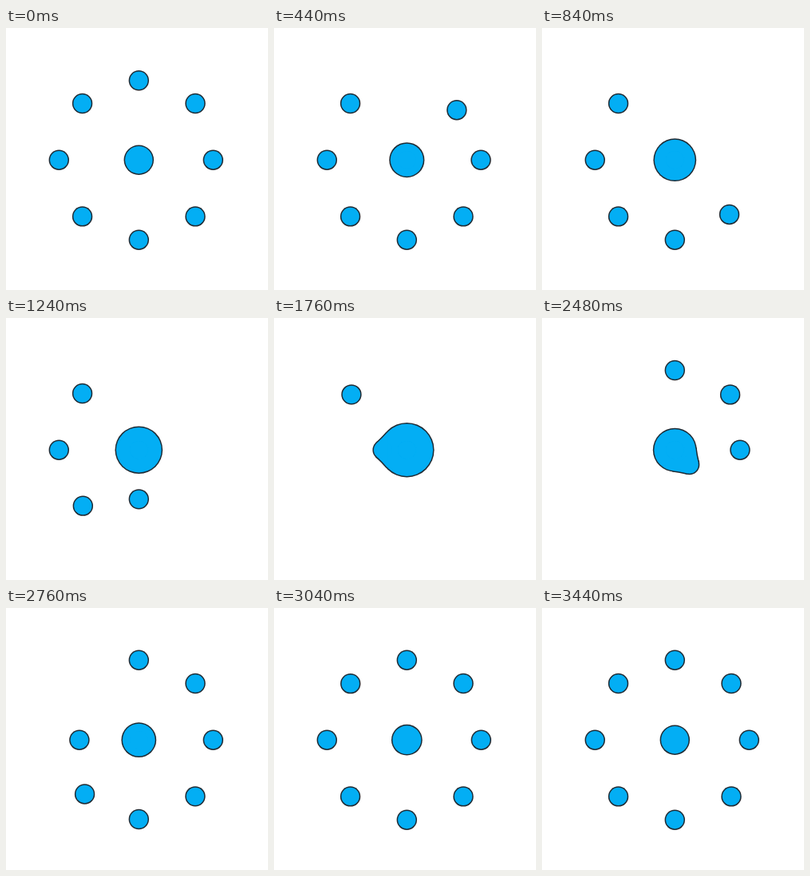
Write an HTML page with a canvas that moves like this. It is 328 px wide and 328 px high and loops after 3480 ms.

```html
<!DOCTYPE html>
<html lang="en">
<head>
<meta charset="utf-8">
<title>Gooey ring</title>
<style>
  html, body { margin: 0; width: 100%; height: 100%; overflow: hidden; background: #fff; }
  canvas { display: block; width: 328px; height: 328px; }
</style>
</head>
<body>
<canvas id="stage"></canvas>
<script>
const LOOP = 3480, COUNT = 8, TURN = 2120;
const CX = 166.3, CY = 165.2;
const BALL = 12.7, CORE = 18.7, FULL = 36.5;
const LINE = 1.5, FILL = '#03aef4', INK = '#1f2a33';

const canvas = document.getElementById('stage');
const ctx = canvas.getContext('2d');
const dpr = window.devicePixelRatio || 1;
canvas.width = canvas.height = 328 * dpr;

const clamp = x => Math.min(1, Math.max(0, x));
const expoIn = x => x <= 0 ? 0 : x >= 1 ? 1 : 2 ** (10 * (x - 1));
const expoOut = x => 1 - expoIn(1 - x);
const cubicOut = x => 1 - (1 - x) ** 3;

// Balls are swallowed one by one, clockwise from the top, then shot out again.
const swallowed = (i, t) => expoIn((t + 118 - 240 * i) / 463);
const released = (i, t) => expoOut((t - 2234 - 78 * i) / 300);

function ballDistance(i, t) {
  const rest = i === 2 ? 93 : 100;
  return rest * (t < TURN ? 1 - swallowed(i, t) : released(i, t));
}

// While filling up, the core's area grows with what it has swallowed.
function coreRadius(t) {
  if (t >= TURN) {
    return FULL + (CORE - FULL) * cubicOut(clamp((t - 2220) / 1240));
  }
  let eaten = 0;
  for (let i = 0; i < COUNT; i++) eaten += swallowed(i, t) / COUNT;
  return Math.sqrt(CORE ** 2 + (FULL ** 2 - CORE ** 2) * eaten);
}

function disc(x, r) {
  ctx.beginPath();
  ctx.arc(x, 0, r, 0, 2 * Math.PI);
  ctx.fill();
}

// Concave bridge between the core and a ball on the x axis; it straightens as they overlap.
function neck(R, d, inset) {
  if (d <= R - BALL + 0.1) return;
  const bend = 8 + 0.8 * Math.max(0, R + BALL - d) ** 2;
  const a = R + bend, b = BALL + bend;
  const x = (d * d + a * a - b * b) / (2 * d);
  const h = Math.sqrt(Math.max(0, a * a - x * x));
  const rho = bend + inset;
  if (x < d && h <= rho) return;
  ctx.beginPath();
  ctx.arc(x, h, rho, Math.atan2(-h, -x), Math.atan2(-h, d - x));
  ctx.arc(x, -h, rho, Math.atan2(h, d - x), Math.atan2(h, -x));
  ctx.closePath();
  ctx.fill();
}

function paint(t, color, inset) {
  const R = coreRadius(t);
  ctx.fillStyle = color;
  disc(0, R - inset);
  for (let i = 0; i < COUNT; i++) {
    const d = ballDistance(i, t);
    ctx.save();
    ctx.rotate((i - 2) * Math.PI / 4);
    disc(d, BALL - inset);
    neck(R, d, inset);
    ctx.restore();
  }
}

function frame() {
  const t = performance.now() % LOOP;
  ctx.setTransform(dpr, 0, 0, dpr, 0, 0);
  ctx.fillStyle = '#fff';
  ctx.fillRect(0, 0, 328, 328);
  ctx.translate(CX, CY);
  paint(t, INK, 0);
  paint(t, FILL, LINE);
  requestAnimationFrame(frame);
}
frame();
</script>
</body>
</html>
```
